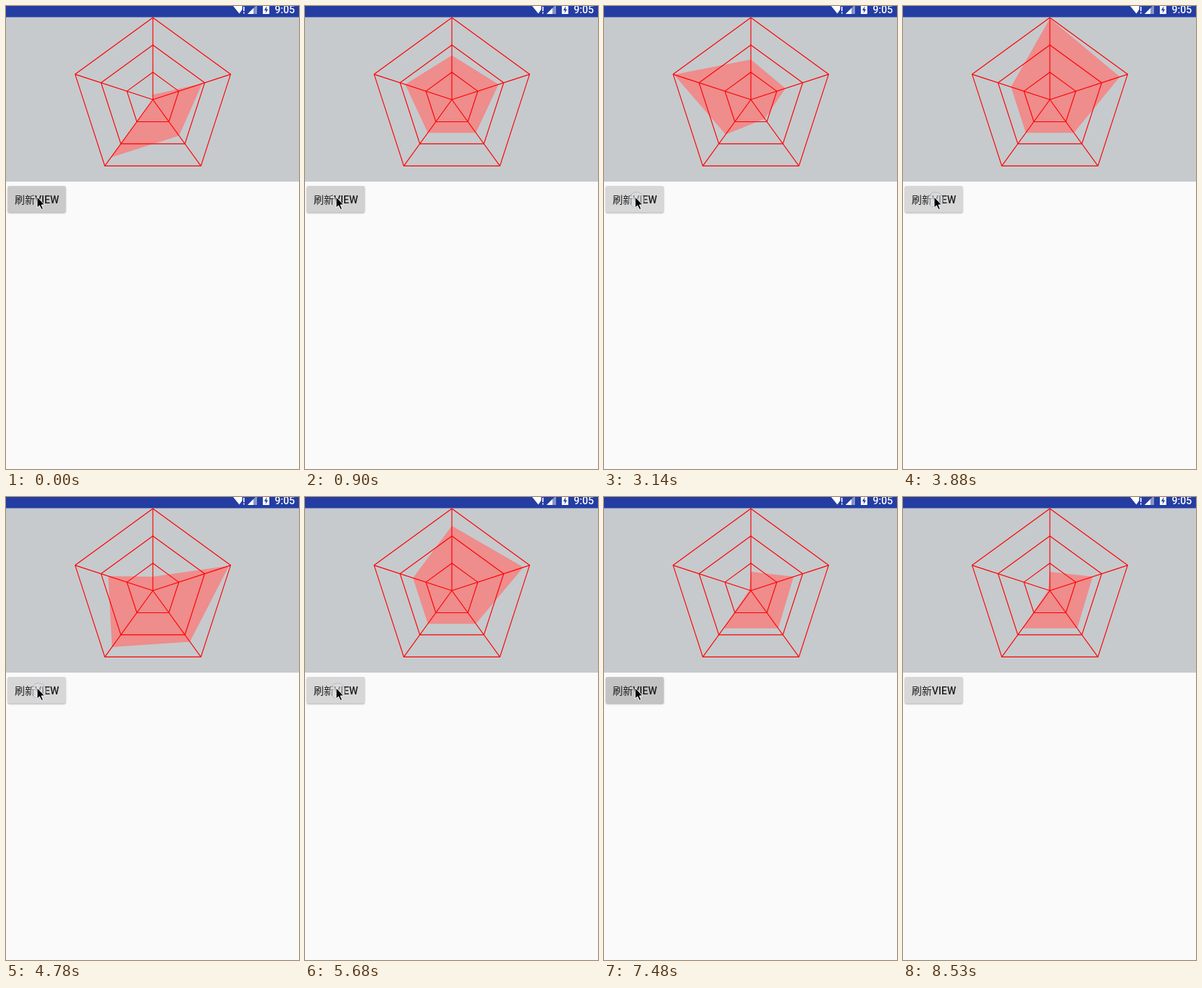
Write an HTML page with a canvas that moves like this. It is 405 by 638 pixels and loops after 9020 ms.

```html
<!DOCTYPE html>
<html lang="zh">
<head>
<meta charset="utf-8">
<style>
html, body { margin: 0; width: 100%; height: 100%; overflow: hidden; background: #fafafa; }
canvas { display: block; width: 405px; height: 638px; }
</style>
</head>
<body>
<canvas width="405" height="638"></canvas>
<script>
const LOOP = 9020;
const CENTER = { x: 203, y: 129 }, RADIUS = 113;
const ctx = document.querySelector('canvas').getContext('2d');

// Each tap: time, pressed grey, new values (top, then clockwise).
const taps = [
  { at: -150, grey: 0xc9, values: [.06, .635, .545, .87, 0] },
  { at: 750, grey: 0xd0, values: [.54, .6, .5, .5, .6] },
  { at: 1350, grey: 0xc4, values: [.69, .98, .555, .425, .93] },
  { at: 2400, grey: 0xd0, values: [.49, .445, .29, .525, .99] },
  { at: 3140, grey: 0xd0, values: [.99, .9, .5, .5, .5] },
  { at: 3880, grey: 0xc4, values: [.17, .98, .77, .85, .575] },
  { at: 4780, grey: 0xc4, values: [.79, .92, .5, .5, .5] },
  { at: 5680, grey: 0xd0, values: [.07, .37, .2, .66, .355] },
  { at: 6580, grey: 0xc4, values: [.97, .35, .5, .5, .5] },
  { at: 7330, grey: 0xc2, values: [.23, .55, .57, .57, .02] }
];

// Pointer positions once it leaves the button.
const pointerPath = [
  [0, 43, 263], [7780, 100, 325], [7930, 225, 462], [8080, 322, 568],
  [8230, 340, 596], [8380, 352, 622], [8530, 0, 700]
];

function polygon(points) {
  ctx.beginPath();
  points.forEach(([x, y]) => ctx.lineTo(x, y));
  ctx.closePath();
}

function fillPolygon(points, color) {
  polygon(points);
  ctx.fillStyle = color;
  ctx.fill();
}

function rect(x, y, w, h, color) {
  ctx.fillStyle = color;
  ctx.fillRect(x, y, w, h);
}

function text(string, x, y, font, color) {
  ctx.font = font;
  ctx.fillStyle = color;
  ctx.fillText(string, x, y);
}

function corner(index, value) {
  const angle = index * Math.PI * 2 / 5 - Math.PI / 2;
  return [CENTER.x + RADIUS * value * Math.cos(angle), CENTER.y + RADIUS * value * Math.sin(angle)];
}

function drawStatusBar() {
  rect(0, 0, 405, 15.5, '#243da3');
  fillPolygon([[314, 0], [330, 0], [322.5, 10.5]], '#fff');
  rect(326.5, 0, 4, 11, '#243da3');
  rect(328, 1, 1.6, 6, '#fff');
  rect(328, 8.5, 1.6, 2, '#fff');
  fillPolygon([[334, 11], [347, 11], [347, -2]], '#8794cb');
  fillPolygon([[334, 11], [342, 11], [342, 3]], '#fff');
  rect(355, 0, 9, 11, '#fff');
  fillPolygon([[360.5, 0], [357, 6], [359.3, 6], [358.7, 10], [362.2, 4.5], [360, 4.5]], '#243da3');
  text('9:05', 371.5, 9.5, '500 14px Roboto, sans-serif', '#fff');
}

function drawRadar(values) {
  rect(0, 15.5, 405, 226.5, '#c6cacd');
  fillPolygon(values.map((value, i) => corner(i, value)), '#ef8c8c');
  ctx.strokeStyle = '#f00';
  ctx.lineWidth = 1.15;
  for (const scale of [1 / 3, 2 / 3, 1]) {
    polygon(values.map((_, i) => corner(i, scale)));
    ctx.stroke();
  }
  values.forEach((_, i) => {
    ctx.beginPath();
    ctx.moveTo(CENTER.x, CENTER.y);
    ctx.lineTo(...corner(i, 1));
    ctx.stroke();
  });
}

function drawButton(grey, pressed) {
  ctx.save();
  ctx.shadowColor = 'rgba(0,0,0,.3)';
  ctx.shadowBlur = 2;
  ctx.shadowOffsetY = 1;
  ctx.beginPath();
  ctx.roundRect(2.5, 248, 80, 36.5, 2);
  ctx.fillStyle = `rgb(${grey},${grey + 1},${grey})`;
  ctx.fill();
  ctx.restore();
  text('刷新', 12, 271.5, '14px "Noto Sans CJK SC", "Noto Sans CJK", sans-serif', '#202020');
  text('VIEW', 40, 271.5, '500 14px Roboto, sans-serif', '#202020');
  if (pressed) {
    ctx.beginPath();
    ctx.arc(45, 267, 10.5, 0, Math.PI * 2);
    ctx.fillStyle = 'rgba(222,223,226,.55)';
    ctx.fill();
    ctx.strokeStyle = 'rgba(165,168,190,.6)';
    ctx.lineWidth = 1;
    ctx.stroke();
  }
}

function drawPointer(x, y) {
  const outline = [[0, 0], [0, 15], [3.4, 12], [6, 17.5], [8.4, 16.4], [6, 11], [10.5, 11]];
  polygon(outline.map(([dx, dy]) => [x + dx, y + dy]));
  ctx.fillStyle = '#000';
  ctx.fill();
  ctx.strokeStyle = '#fff';
  ctx.lineWidth = 1;
  ctx.stroke();
}

function draw(time) {
  const index = taps.findLastIndex(tap => tap.at <= time);
  const tap = taps[index], age = time - tap.at;
  const pressed = age < 150;
  const shown = pressed ? taps[index - 1] : tap;
  const grey = pressed || age >= 1050 ? 0xd6 : age < 300 || (index === 0 && time < 300) ? tap.grey : 0xd3;

  rect(0, 0, 405, 638, '#fafafa');
  drawRadar(shown.values);
  drawStatusBar();
  drawButton(grey, pressed);
  const [, x, y] = pointerPath.findLast(([start]) => start <= time);
  drawPointer(x, y);
}

const start = performance.now();
function tick() {
  draw((performance.now() - start) % LOOP);
  requestAnimationFrame(tick);
}
tick();
</script>
</body>
</html>
```
